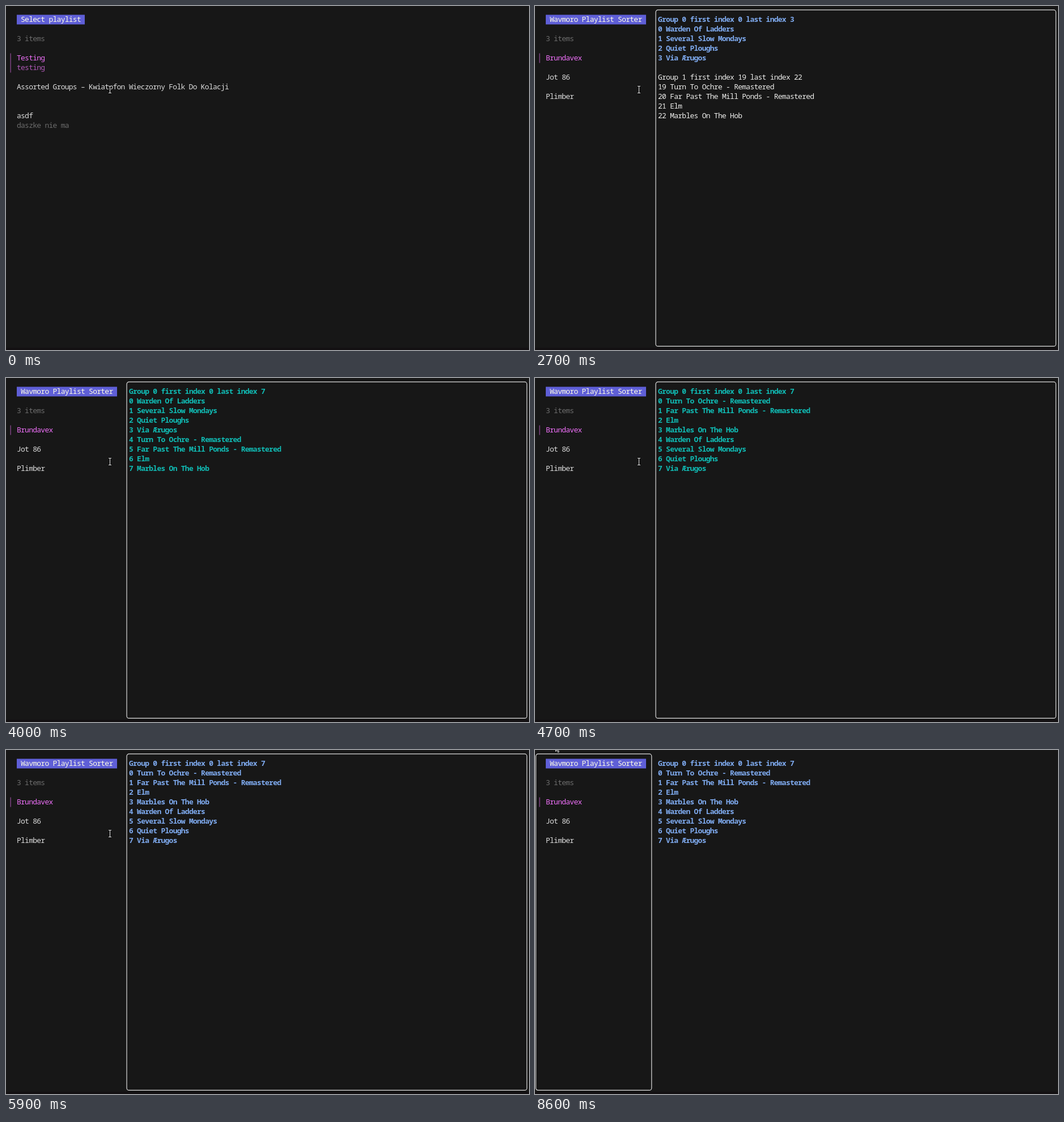
An HTML page with a canvas for the animation above (8800 ms loop, 923 by 607 pixels).

```html
<!DOCTYPE html>
<html lang="en">
<head>
<meta charset="utf-8">
<title>Playlist sorter</title>
<style>
  html, body { margin: 0; width: 100%; height: 100%; overflow: hidden; background: #171717; }
  canvas { display: block; }
</style>
</head>
<body>
<canvas id="stage" width="923" height="607"></canvas>
<script>
const ctx = document.getElementById('stage').getContext('2d');
const LOOP = 8800, CELL = 7.06, ROW = 17;
const LEFT = 19, RIGHT = 217;
const color = {
  bg: '#171717', text: '#dddddd', bright: '#eeeeec', dim: '#6c6c6c', title: '#5f5fd7',
  pink: '#ee6ff8', plum: '#ad58b4', blue: '#7fabf0', cyan: '#10bcb5'
};

const first = ['Warden Of Ladders', 'Several Slow Mondays', 'Quiet Ploughs', 'Via Ærugos'];
const second = ['Turn To Ochre - Remastered', 'Far Past The Mill Ponds - Remastered',
  'Elm', 'Marbles On The Hob'];

// Text on the terminal grid: row 0 is centred at y = 24.
function write(text, x, row, fill, weight = 400) {
  ctx.font = `${weight} 13px "Noto Sans Mono", "DejaVu Sans Mono", monospace`;
  ctx.letterSpacing = '-0.74px';
  ctx.fillStyle = fill;
  ctx.fillText(text, x, 28 + row * ROW);
}

function header(text) {
  ctx.fillStyle = color.title;
  ctx.fillRect(LEFT, 15.5, Math.round((text.length + 2) * CELL), ROW);
  write(text, LEFT + CELL, 0, '#ffffe4');
  write('3 items', LEFT, 2, color.dim);
}

function selectionBar(rows) {
  ctx.fillStyle = color.plum;
  ctx.fillRect(7.6, 83.5, 1, rows * ROW);
}

function group(number, start, songs, row, fill) {
  const weight = fill === color.bright ? 500 : 600;
  const end = start + songs.length - 1;
  write(`Group ${number} first index ${start} last index ${end}`, RIGHT, row, fill, weight);
  songs.forEach((song, i) => write(`${start + i} ${song}`, RIGHT, row + 1 + i, fill, weight));
}

function border(x, width) {
  ctx.strokeStyle = '#dedede';
  ctx.lineWidth = 1.2;
  ctx.beginPath();
  ctx.roundRect(x, 6.9, width, 593.5, 4);
  ctx.stroke();
}

function playlistMenu() {
  header('Select playlist');
  selectionBar(2);
  write('Testing', LEFT, 4, color.pink);
  write('testing', LEFT, 5, color.plum);
  write('Assorted Groups – Kwiatofon Wieczorny Folk Do Kolacji', LEFT, 7, color.text);
  write('asdf', LEFT, 10, color.text);
  write('daszke nie ma', LEFT, 11, color.dim);
}

function sorter(t) {
  header('Wavmoro Playlist Sorter');
  selectionBar(1);
  write('Brundavex', LEFT, 4, color.pink);
  write('Jot 86', LEFT, 6, color.text);
  write('Plimber', LEFT, 8, color.text);

  if (t >= 2700 && t < 7700) border(213.1, 706.2);
  else border(1.5, 204.3);

  if (t < 4000) {
    const { bright, blue, cyan } = color;
    group(0, 0, first, 0, t < 3200 ? blue : bright);
    group(1, 19, second, 6, t < 3200 ? bright : t < 3600 ? blue : cyan);
  } else {
    const songs = t < 4700 ? [...first, ...second] : [...second, ...first];
    group(0, 0, songs, 0, t < 5700 ? color.cyan : color.blue);
  }
}

function iBeam(x, y) {
  const path = new Path2D(`M${x - 2.5} ${y - 6}h2l.5 .5l.5 -.5h2
    M${x} ${y - 5.5}v11M${x - 2.5} ${y + 6}h2l.5 -.5l.5 .5h2`);
  ctx.strokeStyle = '#000';
  ctx.lineWidth = 2.6;
  ctx.stroke(path);
  ctx.strokeStyle = '#eeeeee';
  ctx.lineWidth = 1.1;
  ctx.stroke(path);
}

function arrow(x, y) {
  const path = new Path2D(`M${x} ${y}v10.5l2.4 -2.3l1.8 4l1.7 -.8l-1.8 -3.8h3.3z`);
  ctx.fillStyle = '#000';
  ctx.fill(path);
  ctx.strokeStyle = '#eeeeee';
  ctx.lineWidth = 1;
  ctx.stroke(path);
}

// The pointer is sampled every 100 ms on its way to the top edge.
function pointer(t) {
  if (t >= 8600) return arrow(36.5, -8);
  const k = Math.min(4, Math.max(0, Math.floor((t - 8000) / 100))) / 4;
  const p = k * k * (3 - 2 * k);
  iBeam(Math.round(183 - 127 * p) + 0.5, Math.round(147 - 140 * p) + 0.5);
}

function draw(t) {
  ctx.fillStyle = color.bg;
  ctx.fillRect(0, 0, 923, 607);
  ctx.fillStyle = '#131012';
  ctx.fillRect(0, 603, 923, 4);
  if (t < 900) playlistMenu();
  else sorter(t);
  pointer(t);
}

const begin = performance.now();
function tick() {
  draw((performance.now() - begin) % LOOP);
  requestAnimationFrame(tick);
}
tick();
</script>
</body>
</html>
```
